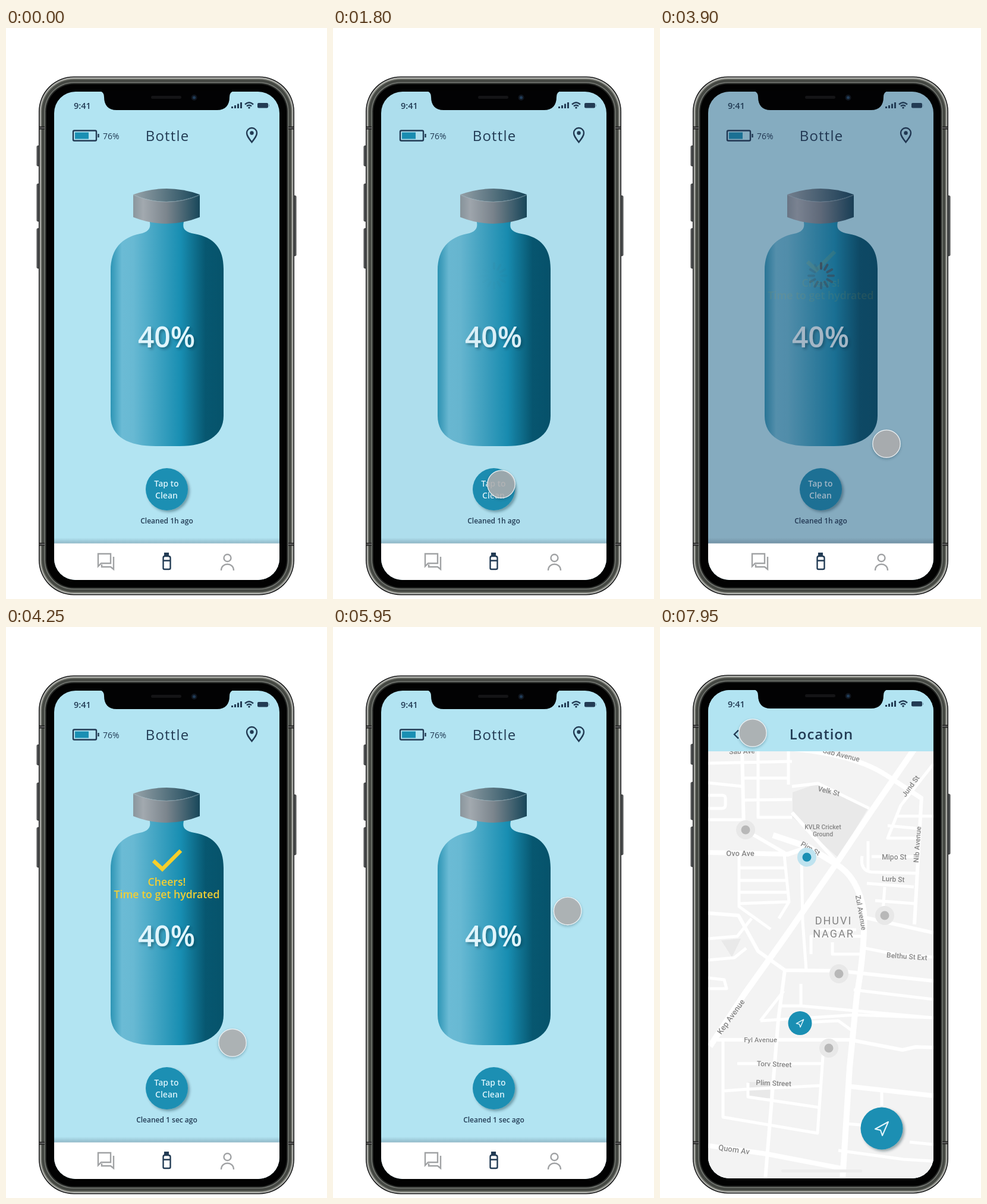
Write an HTML page that moves like this. It is 540 px wide and 960 px high and loops after 8000 ms.

```html
<!DOCTYPE html>
<html lang="en">
<head>
<meta charset="utf-8">
<title>Bottle app</title>
<style>
  html, body { margin: 0; width: 100%; height: 100%; overflow: hidden; background: #fff; }
  svg { display: block; width: 100%; height: 100%; font-family: "Open Sans", sans-serif; font-weight: 600; }
  .mid { text-anchor: middle; }
  .ink { fill: #223b54; }
  .line { fill: none; stroke: #223b54; stroke-width: 2.4; }
  .gray { stroke: #a0a2a4; }
  .round { stroke-linecap: round; stroke-linejoin: round; }
  .roads { fill: none; stroke: #fff; stroke-linejoin: round; }
  #labels { font: 500 12px Roboto, sans-serif; fill: #858585; text-anchor: middle; }
</style>
</head>
<body>
<svg viewBox="0 0 540 960">
  <defs>
    <linearGradient id="glass">
      <stop offset="0" stop-color="#2d95b5"/><stop offset=".1" stop-color="#6bbbd5"/>
      <stop offset=".2" stop-color="#68b9d3"/><stop offset=".62" stop-color="#188eb2"/>
      <stop offset=".84" stop-color="#075770"/><stop offset="1" stop-color="#06536b"/>
    </linearGradient>
    <linearGradient id="cap">
      <stop offset="0" stop-color="#8a969d"/><stop offset=".15" stop-color="#a2a9af"/>
      <stop offset=".5" stop-color="#7b858d"/><stop offset="1" stop-color="#17475a"/>
    </linearGradient>
    <linearGradient id="lid">
      <stop offset="0" stop-color="#98a3a9"/><stop offset=".5" stop-color="#587480"/>
      <stop offset="1" stop-color="#174559"/>
    </linearGradient>
    <linearGradient id="navShade" x2="0" y2="1">
      <stop offset="0" stop-color="#456" stop-opacity="0"/><stop offset="1" stop-color="#456" stop-opacity=".32"/>
    </linearGradient>
    <filter id="shadow" x="-30%" y="-30%" width="170%" height="170%">
      <feDropShadow dx="3" dy="3" stdDeviation="2" flood-color="#123" flood-opacity=".38"/>
    </filter>
    <filter id="soft" x="-30%" y="-30%" width="160%" height="160%">
      <feDropShadow dx="0" dy="2" stdDeviation="2" flood-color="#234" flood-opacity=".35"/>
    </filter>
    <clipPath id="screen"><rect x="81" y="107" width="379" height="821" rx="36"/></clipPath>
    <path id="arrow" d="M11-11L-11 1L-2 3L1 12Z" fill="none" stroke="#e4f6fc" stroke-linejoin="round"/>
  </defs>

  <g id="phone">
    <g fill="#55585a" stroke="#222" stroke-width=".8">
      <rect x="52" y="198" width="5" height="34" rx="1.5"/>
      <rect x="52" y="262" width="5" height="63" rx="1.5"/>
      <rect x="52" y="337" width="5" height="67" rx="1.5"/>
      <rect x="483" y="282" width="5" height="101" rx="1.5"/>
    </g>
    <g id="shell"></g>
    <path d="M56 168h9M475 168h9M56 868h9M475 868h9" stroke="#222" stroke-width="5"/>
    <path d="M56 168h9M475 168h9M56 868h9M475 868h9" stroke="#777" stroke-width="1.5"/>

    <g clip-path="url(#screen)">
      <rect x="81" y="107" width="379" height="822" fill="#b2e4f2"/>
      <g id="bottlePage">
        <rect x="113" y="172.5" width="39" height="17" rx="2" class="line" stroke-width="2"/>
        <rect x="116" y="175.500" width="23" height="11" fill="#1a8fb3"/>
        <path d="M155.500 178v6" class="line"/>
        <text x="163" y="187" font-size="14" font-weight="500" class="ink">76%</text>
        <text x="271.500" y="190" font-size="24" letter-spacing="1.200" font-weight="500" class="ink mid">Bottle</text>
        <path d="M413.500 192C408 185 405 181 405 176.500a8.500 8.500 0 0 1 17 0C422 181 419 185 413.500 192Z" class="line"/>
        <circle cx="413.500" cy="176.500" r="3.200" class="ink"/>

        <path fill="url(#glass)" d="M241 322C244 334 243 342 225 346C196 352 176 370 176 408V652C176 688 207 703 252 703H292C336 703 366 686 366 652V405C366 370 350 352 317 346C298 342 296 336 300 322Z"/>
        <path fill="url(#cap)" d="M214 280Q270 304 326 280V318Q270 340 214 318Z"/>
        <path fill="url(#lid)" d="M214 280Q270 260 326 280Q270 304 214 280Z"/>
        <path d="M214 281Q270 304 326 281" fill="none" stroke="#a9bac2" stroke-opacity=".65" stroke-width=".8"/>
        <text x="270" y="537" font-size="48" fill="#e0f5fc" class="mid" filter="url(#shadow)">40%</text>
        <circle cx="270.500" cy="775.500" r="35.500" fill="#1a8fb3" filter="url(#shadow)"/>
        <g font-size="14" fill="#d8f2fb" class="mid"><text x="270" y="770.500">Tap to</text><text x="270" y="790.500">Clean</text></g>
        <text id="cleaned" x="270.500" y="833" font-size="12" class="ink mid"></text>

        <g id="cheers" fill="#f2ce33" font-size="17.700" class="mid">
          <path d="M248 393L263 407L294 376" fill="none" stroke="#f7cf2b" stroke-width="6.500"/>
          <text x="270.500" y="435">Cheers!</text><text x="270.500" y="456">Time to get hydrated</text>
        </g>
        <g id="loading">
          <rect x="81" y="107" width="379" height="760" fill="#222b4d" opacity=".35"/>
          <g id="spinner" transform="translate(271 416.500)" stroke="#3b4554" stroke-width="4" stroke-linecap="round"></g>
        </g>

        <rect x="81" y="857" width="379" height="10" fill="url(#navShade)"/>
        <rect x="81" y="866.500" width="379" height="62" fill="#fff"/>
        <path d="M155 884H176V900H160L155 905ZM181 889V910L176 906H161V902" class="line gray"/>
        <path d="M264.500 891Q264.500 888 267 888H273Q276.500 888 276.500 891V908Q276.500 910 274 910H266.500Q264.500 910 264.500 908ZM265 895.500H276" class="line"/>
        <rect x="266" y="882" width="8" height="5" class="ink"/>
        <circle cx="372.500" cy="891" r="6" class="line gray"/>
        <path d="M362 912C362 898 383 898 383 912" class="line gray"/>
      </g>

      <g id="mapPage">
        <rect x="81" y="107" width="379" height="103" fill="#b2e4f2"/>
        <path d="M132 174.500L125 181.500L132 188.500" class="line"/>
        <text x="271.500" y="190" font-size="24" letter-spacing="1" class="ink mid">Location</text>
        <svg x="81" y="210" width="379" height="719" viewBox="81 209 379 719">
          <rect x="81" y="209" width="379" height="719" fill="#f3f3f3"/>
          <path fill="#e9e9e9" d="M223 278L266 263L350 305L300 388L223 320ZM103 527L136 524L121 555ZM148 765H185V792H148Z"/>
          <g class="roads" id="roads"></g>
          <g id="labels"></g>
          <g id="places"></g>
          <rect x="204" y="912" width="136" height="5" rx="2.500" fill="#ececec"/>
          <circle cx="235.500" cy="666" r="20" fill="#1a8fb3"/>
          <use href="#arrow" stroke-width="2.600" transform="translate(235.500 666) scale(.56)"/>
          <circle cx="373" cy="843" r="35.500" fill="#1a8fb3" filter="url(#shadow)"/>
          <use href="#arrow" stroke-width="2" transform="translate(373 843)"/>
        </svg>
      </g>

      <text x="114" y="136" font-size="14.500" class="ink">9:41</text>
      <path d="M379 132h3v3h-3zM384 130h3v5h-3zM389 127.500h3v7.500h-3zM394 125h3v10h-3z" class="ink"/>
      <path d="M402 128.500Q409 122 416 128.500M405 131.500Q409 128 413 131.500" class="line" stroke-width="2"/>
      <circle cx="409" cy="134" r="1.700" class="ink"/>
      <rect x="423" y="126" width="18" height="8.500" rx="2" class="ink"/><path d="M442.500 128.500v3.500" stroke="#6e94a8"/>
    </g>
    <path d="M157 106Q165 107 165 116C165 130 172 138 186 138H355C369 138 376 130 376 116Q376 107 384 106Z" fill="#020203"/>
    <rect x="244" y="114" width="51" height="5" rx="2.500" fill="#141416"/>
    <circle cx="316.500" cy="117" r="5" fill="#10161f"/><circle cx="316.500" cy="117" r="2.500" fill="#203c58"/>
  </g>

  <g id="cursor" filter="url(#soft)">
    <circle r="23.200" fill="#b0afb0" fill-opacity=".83" stroke="#eef3f5" stroke-width="1.200"/>
  </g>
</svg>
<script>
const $ = id => document.getElementById(id);
const fill = (id, items, draw) => { $(id).innerHTML = items.map(draw).join(''); };

// Nested rounded rectangles: inset and colour
fill('shell', [[0, '#171818'], [1.6, '#b9bab7'], [3.2, '#85877f'], [5, '#454843'], [9.5, '#777a75'], [11, '#252725'], [13, '#020202']],
  ([d, color]) => `<rect x="${55 + d}" y="${81.5 + d}" width="${430 - 2 * d}" height="${872 - 2 * d}" rx="${59 - d}" fill="${color}"/>`);

fill('spinner', [...Array(12).keys()],
  i => `<path d="M0-12V-21" transform="rotate(${i * 30})" opacity="${(0.95 - i * 0.07).toFixed(2)}"/>`);

fill('roads', [
  [10, 'M84 705L142 617L210 522L295 400L356 309L428 205M190 350L250 370L295 398Q334 420 343 480Q345 540 331 620L319 740L307 930'],
  [8, 'M225 205Q330 215 382 250L440 288M81 379L215 382L250 370M81 872L180 886L310 911M315 772L460 788'],
  [6, 'M96 694H320L408 711L430 706L460 707M138 205L141 340L210 380M222 312L300 398M210 577L199 660L177 930M440 285L428 500M81 481L132 485L165 545L210 577M210 577L300 578L460 595M343 488L460 514'],
  [5, 'M81 229L222 226M138 254H216M165 209V320H222M81 262L139 268M139 291L222 290M81 283H105Q111 283 110 291V299Q110 305 104 305H81M216 209V265M222 268L266 263L352 305M81 324H140'],
  [5, 'M133 380V470L186 508M133 405H210M133 426H212M133 446H213M133 465L217 462L200 490M209 383L217 462M238 390L240 495L246 577M81 524L130 520L154 490M81 560L125 556L145 540M81 590L108 593L112 608H81'],
  [5, 'M460 230L405 300L383 355H434M460 318H398M383 334L437 339M340 385Q336 410 356 412L430 414M356 386H432M348 431L427 437M378 437L374 492M362 460L428 465M350 360V412M345 540L400 551L460 555M267 509H330M254 550V520H340M290 530V550H338'],
  [5, 'M169 662L208 612M169 662L330 652L460 657M237 600V637L460 657M200 637H237M325 680L300 662L237 665M326 610L460 626M106 694V824L265 851L275 708M130 734H275M106 780L148 777L272 771M148 766V790L269 808M373 775V805M312 835L350 838M420 866L460 870M300 880L410 895L460 898']
], ([width, d]) => `<path d="${d}" stroke-width="${width}"/>`);

// text, x, y, rotation, size
fill('labels', [
  ['Sab Ave', 138, 213, -2], ['Sab Avenue', 304, 219, 14], ['Velk St', 283, 280, 14], ['Jund St', 425, 270, -54],
  ['KVLR Cricket', 274, 340, 0, 10.5], ['Ground', 274, 352, 0, 10.5], ['Pim St', 251, 376, 30], ['Ovo Ave', 135, 385, 0, 13],
  ['Mipo St', 394, 391, 0], ['Lurb St', 392, 428, 3], ['Nib Avenue', 437, 366, -86], ['Zul Avenue', 334, 481, 80],
  ['DHUVI', 292, 500, 0, 18], ['NAGAR', 292, 522, 0, 18], ['Belthu St Ext', 415, 558, 4],
  ['Kep Avenue', 123, 658, -54, 13], ['Fyl Avenue', 169, 698, 0, 11.5], ['Torv Street', 192, 739, 2], ['Plim Street', 191, 771, 2],
  ['Quom Av', 124, 883, 8, 13]
], ([text, x, y, turn, size = 12]) =>
  `<text transform="translate(${x} ${y}) rotate(${turn})" font-size="${size}"${size > 15 ? ' letter-spacing="2" font-weight="400"' : ''}>${text}</text>`);

fill('places', [[144, 341], [378, 485], [301, 583], [284, 708], [247, 387, '#1a8fb3', '#bfe3ef']],
  ([x, y, dot = '#b8b8b8', halo = '#e8e8e8']) =>
    `<circle cx="${x}" cy="${y}" r="16" fill="${halo}"/><circle cx="${x}" cy="${y}" r="7.5" fill="${dot}"/>`);

const smooth = (t, from, to) => {
  const u = Math.min(1, Math.max(0, (t - from) / (to - from)));
  return u * u * (3 - 2 * u);
};

// time, x, y
const cursorStops = [
  [0, 575, 990], [400, 575, 990], [1150, 328, 715], [1500, 283, 767], [1800, 283, 767], [2250, 381, 699],
  [5545, 381, 699], [6445, 413, 180], [7250, 413, 178], [8130, 125, 178]
];

function cursorAt(t) {
  const i = cursorStops.findIndex(stop => stop[0] > t);
  const [t0, x0, y0] = cursorStops[i - 1], [t1, x1, y1] = cursorStops[i];
  const k = smooth(t, t0, t1);
  return [x0 + (x1 - x0) * k, y0 + (y1 - y0) * k];
}

function render(now) {
  const t = now % 8000;
  const done = smooth(t, 3810, 4220), map = smooth(t, 6780, 7120);
  $('loading').setAttribute('opacity', smooth(t, 1750, 2050) * (1 - done));
  $('cheers').setAttribute('opacity', done * (1 - smooth(t, 5200, 5500)));
  $('cleaned').textContent = done < 0.5 ? 'Cleaned 1h ago' : 'Cleaned 1 sec ago';
  $('mapPage').setAttribute('opacity', map);
  $('phone').setAttribute('transform', `translate(0 ${-map})`);
  $('cursor').setAttribute('transform', `translate(${cursorAt(t)})`);
  requestAnimationFrame(render);
}
render(0);
</script>
</body>
</html>
```
